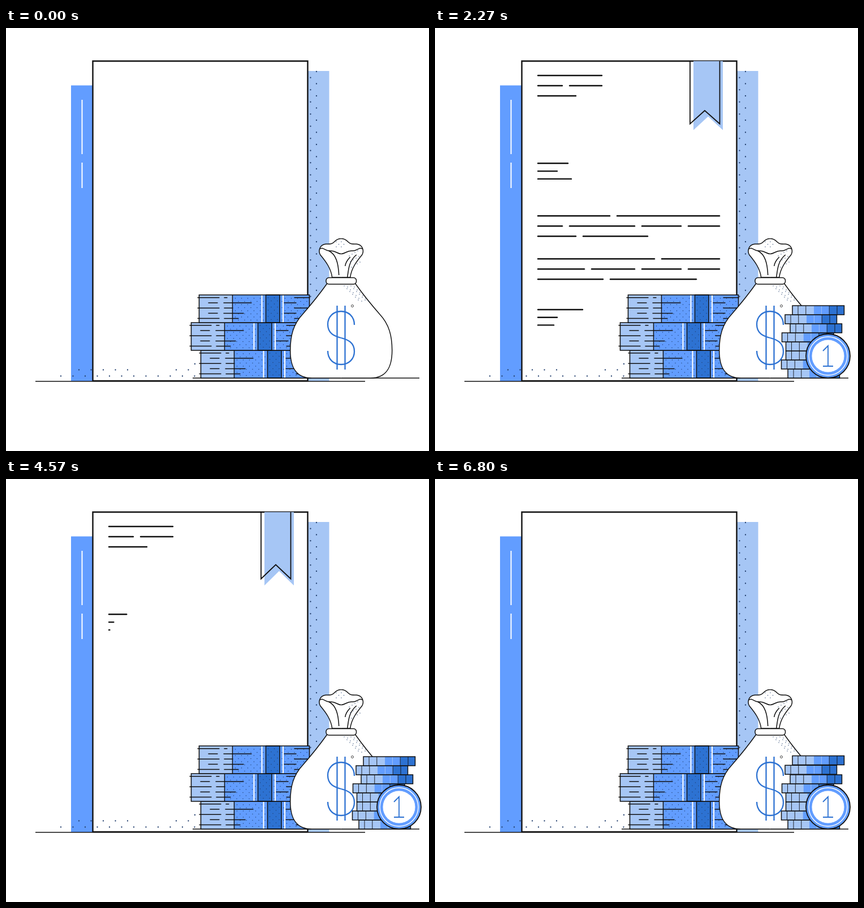
Animation of 748 by 748 pixels, one loop 7.63 s. Source, as an HTML page with a canvas:

```html
<!DOCTYPE html>
<html lang="en">
<head>
<meta charset="utf-8">
<title>Document, cash and coins</title>
<style>
html, body { margin: 0; width: 100%; height: 100%; overflow: hidden; background: #fff; }
canvas { display: block; width: 748px; height: 748px; }
</style>
</head>
<body>
<canvas id="stage" width="748" height="748"></canvas>
<script>
const c = document.getElementById('stage').getContext('2d');
const INK = '#111', PALE = '#a6c6f5', BLUE = '#629dff', DEEP = '#2d72d2', DOT = '#24406e';
const LOOP = 7630, LAST_MOVE = 6800, PITCH = 21.5;

const clamp = x => Math.max(0, Math.min(1, x));
const backOut = x => 1 + 2.70158 * (x - 1) ** 3 + 1.70158 * (x - 1) ** 2;
const easeInOut = x => x * x * (3 - 2 * x);

function paint(path, fill, color, width) {
  if (fill) { c.fillStyle = fill; c.fill(path); }
  if (color) { c.strokeStyle = color; c.lineWidth = width; c.stroke(path); }
}
function shape(d, fill, color = INK, width = 1.5) {
  paint(new Path2D(d), fill, color, width);
}
function rect(x, y, w, h, fill, width) {
  const p = new Path2D();
  p.rect(x, y, w, h);
  paint(p, fill, width && INK, width);
}
function circle(x, y, r, fill, color, width) {
  const p = new Path2D();
  p.arc(x, y, r, 0, 7);
  paint(p, fill, color, width);
}
function line(x1, y1, x2, y2, color = INK, width = 1.5) {
  shape(`M${x1} ${y1}L${x2} ${y2}`, null, color, width);
}
// Draws half a figure and its copy, flipped by the given scales
function twin(sx, sy, d, fill, color, width) {
  shape(d, fill, color, width);
  c.save();
  c.scale(sx, sy);
  shape(d, fill, color, width);
  c.restore();
}
const dot = (x, y, r = 1.15) => circle(x, y, r, DOT);

function dotRow(x, y, end) {
  for (; x < end; x += PITCH) dot(x, y);
}
// Staggered grid of small dots
function dots(x, y, w, h, step = 11, r = 0.7) {
  for (let j = 0; j * step / 2 < h; j++)
    for (let i = (j % 2) * step / 2; i < w; i += step) dot(x + i, y + j * step / 2, r);
}

// A block of text lines; each line lists where its dashes end
const block = (y, step, lines) => lines.map((ends, i) => ({ y: y + i * step, ends }));
const paragraph = (y, k) =>
  block(y, 18, [[127 + 79 * k, 321], [43 + 39 * k, 171, 253, 321], [67 + 48 * k, 194 + 86 * k]]);
const rows = [
  ...block(84, 18, [[113], [43, 113], [67]]),
  ...block(239.3, 13.8, [[53], [34], [59]]),
  ...paragraph(332.3, 0),
  ...paragraph(408.3, 1),
  ...block(498, 13.7, [[79], [34], [28]])
];

function drawRow({ y, ends }, part) {
  const reach = ends[ends.length - 1] * part;
  let from = 0;
  for (const end of ends) {
    if (from < reach) line(182 + from, y, 182 + Math.min(end, reach), y, INK, 2.4);
    from = end + 13;
  }
}

// The ribbon unrolls by stretching down from the paper's top edge
function drawRibbon(length) {
  if (length <= 0) return;
  c.save();
  c.translate(0, 58.5);
  c.beginPath();
  c.rect(440, 0, 90, 200);
  c.clip();
  c.scale(1, length);
  shape('M457 -9H509V122L483 98L457 122Z', PALE, null);
  shape('M451 -9H503.5V111L477 87.500L451 111Z', null, INK, 1.8);
  c.restore();
}

function drawDocument(t) {
  const late = t >= 3930;
  const age = t - (late ? 3930 : 30);
  const left = 1 - easeInOut(clamp((t - (late ? 6345 : 2270)) / 440));
  drawRibbon(backOut(clamp((age - 250) / 520)) * left);
  rows.forEach((row, k) => drawRow(row, clamp((age - 262 - 72 * k) / 232) ** 1.5 * left));
}

function drawScene() {
  rect(534, 76, 37.5, 549, PALE);
  for (let y = 77; y < 480; y += PITCH) {
    dot(549, y);
    dot(538.5, y + PITCH / 2);
  }
  rect(115, 101.5, 38, 523, BLUE);
  line(134.5, 127, 134.5, 223, '#fff', 2);
  line(134.5, 238, 134.5, 283, '#fff', 2);
  rect(153.5, 58.5, 380, 565.5, '#fff', 2.4);
}

function drawFloor() {
  line(52, 624.7, 635, 624.7);
  line(330, 619, 731, 619);
  dotRow(97, 615.5, 340);
  dotRow(129, 604.5, 220);
  dotRow(301, 604.5, 340);
  dot(334, 594);
}

function drawBundle(x, y) {
  const w = 195, h = 49;
  const bar = (dx, color, width) => line(x + dx, y, x + dx, y + h, color, width);
  rect(x, y, w, h, BLUE);
  rect(x, y, 59, h, PALE);
  dots(x + 64, y + 6, w - 68, h - 8);
  rect(x + 118, y, 24.5, h, DEEP, 1.5);
  dots(x + 122, y + 5, 20, h - 8);
  bar(111, '#fff', 2);
  bar(148.5, '#fff', 2);
  bar(59);
  // Sheet edges: dashes alternate between the outer side and the middle
  for (let j = 0; j < 5; j++) {
    const odd = j % 2, ly = y + 4.8 + 9.2 * j;
    const dash = (a, b) => line(x + a, ly, x + b, ly);
    dash(odd ? 16 : -3, odd ? 33 : 36);
    dash(odd ? 43 : 44, odd ? 100 - 7 * j : 50 + 5 * j);
    dash(odd ? 150 : 168, odd ? 172 : 196);
  }
  rect(x, y, w, h, null, 1.6);
}

function drawBag() {
  c.save();
  c.translate(592.7, 0);
  twin(-1, 1, 'M0 452H-25C-40 473 -54 490 -68 506C-85 524 -90 545 -90 570C-90 600 -80 619 -52 619H0', '#fff');
  twin(-1, 1, 'M0 441H-16C-18 425 -27 413 -37 401C-41 394 -38 383 -27 382C-18 382 -16 382 -12 378Q-7 372.500 0 372.500', '#fff');
  twin(-1, 1, 'M-38 391C-33 386 -27 395 -20 394C-10 393 -7 399.500 0 399.500');
  shape('M-22 394C-9 400 -5 416 -4 437M27 401C14 412 13 425 11 441M16 405Q8 413 7 421');
  c.restore();

  for (let i = 0; i < 12; i++) dot(607 + i % 4 * 5 + (i >> 2) * 2, 403 + (i >> 2) * 10 - i % 4 * 3, 0.65);
  dots(584, 378, 18, 10, 9, 0.65);
  const band = new Path2D();
  band.roundRect(566, 441.5, 53.5, 11.5, 5);
  paint(band, '#fff', INK, 1.5);
  for (let j = 0; j < 6; j++)
    for (let i = 0; i < 4; i++) dot(598 + j * 5 + i * 6, 456 + j * 5 + i % 2 * 2, 0.65);
  circle(612.5, 491.5, 2, '#fff', INK, 0.8);

  c.save();
  c.translate(592.5, 548);
  twin(-1, -1, 'M23.500 -23C23.500 -38 13 -47 0 -47C-14 -47 -23.500 -37 -23.500 -24C-23.500 -8 -12 -3 0 0', null, DEEP, 2.3);
  for (const x of [-7, 7]) line(x, -57, x, 56, DEEP, 2.3);
  c.restore();
}

function drawCoin(x, y) {
  rect(x, y, 91.5, 16, BLUE);
  rect(x, y, 38, 16, PALE);
  rect(x + 65.5, y, 26, 16, DEEP);
  for (let k = 0; k < 6; k++) {
    const lx = x + 10 + 13.8 * k, middle = k === 2 || k === 3;
    line(lx, y, lx, y + 16, middle ? PALE : INK, 0.9);
  }
  rect(x, y, 91.5, 16, null, 1.5);
}

function drawRollingCoin(path, alpha) {
  const shift = (path - 1) * 57;
  c.save();
  c.globalAlpha = alpha;
  c.translate(695 + shift, 580);
  c.rotate(shift * 3.4 * Math.PI / 180);
  circle(0, 0, 39, BLUE, INK, 1.8);
  circle(0, 0, 34, null, '#fff', 1.4);
  circle(0, 0, 28.5, '#fff');
  shape('M-9 -9L0 -18V18M-9 18H9', null, DEEP, 1.8);
  c.restore();
}

// Height above rest while a coin drops and bounces twice
function dropHeight(ms) {
  const hop = (from, to, height, skew) =>
    height * Math.sin(Math.PI * clamp((ms - from) / (to - from)) ** skew);
  if (ms < 380) return 42 * (1 - (ms / 380) ** 2);
  return hop(380, 550, 6, 1.6) + hop(550, 640, 1.6, 1);
}

const coinX = [624, 612.5, 620.5, 620.5, 613.5, 628, 619, 632];
const visits = [{ from: 30, to: 2270 }, { from: 3025, to: 5210 }, { from: 5950, to: Infinity }];

function drawCoins(t) {
  const visit = visits.findLast(v => t >= v.from);
  if (!visit) return;
  const age = t - visit.from, gone = t - visit.to;
  coinX.forEach((x, i) => {
    const ms = age - 37 * i;
    if (ms < 0) return;
    const out = clamp((gone - 63 * i) / 200);
    c.globalAlpha = clamp((0.65 - out) / 0.25);
    drawCoin(x + 19 * out * out, 603 - 16 * i - dropHeight(ms));
  });
  c.globalAlpha = 1;
  const back = clamp(gone / 500);
  const path = backOut(gone > 0 ? 1 - back : clamp(age / 690));
  drawRollingCoin(path, clamp(age / 150) * clamp((1 - back) / 0.25));
}

function frame(now) {
  const t = Math.min(now % LOOP, LAST_MOVE);
  c.clearRect(0, 0, 748, 748);
  drawScene();
  c.lineCap = 'round';
  drawDocument(t);
  c.lineCap = 'butt';
  drawFloor();
  drawBundle(344.5, 570);
  drawBundle(327.5, 521);
  drawBundle(341.5, 472);
  drawBag();
  drawCoins(t);
}

const start = performance.now();
function tick() {
  frame(performance.now() - start);
  requestAnimationFrame(tick);
}
tick();
</script>
</body>
</html>
```
